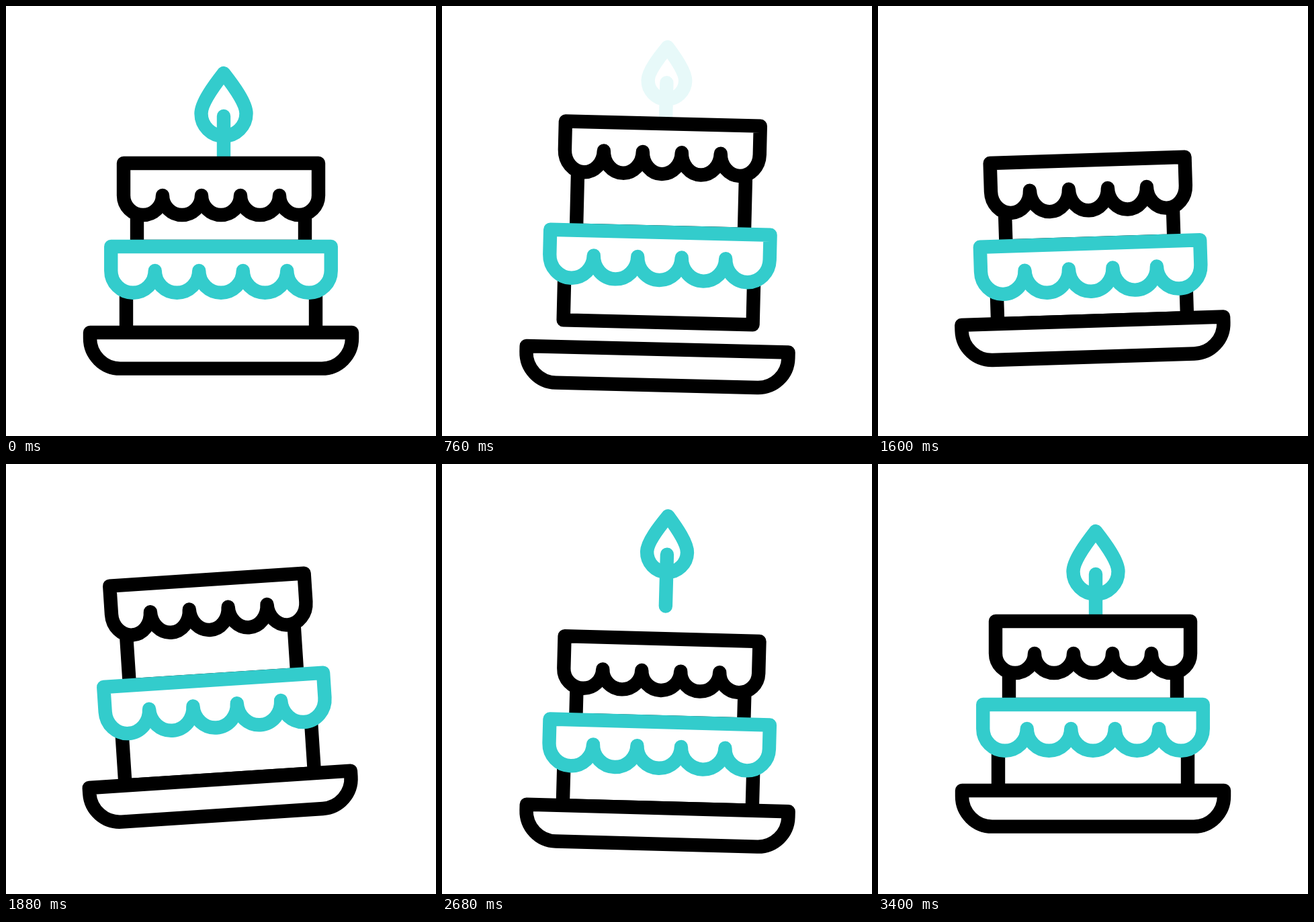
These frames come from a looping animation (640x640 px, 3600 ms). An HTML page with a canvas:

```html
<!DOCTYPE html>
<html lang="en">
<head>
<meta charset="utf-8">
<title>Birthday cake</title>
<style>
  html, body { margin: 0; height: 100%; overflow: hidden; background: #fff; }
  canvas { display: block; }
</style>
</head>
<body>
<canvas id="stage" width="640" height="640"></canvas>
<script>
const ctx = document.getElementById('stage').getContext('2d');
const LOOP = 3600, BLACK = '#000', TEAL = '#33cccc';

const clamp = u => Math.min(1, Math.max(0, u));

// Sine easing from 0 to 1 between two times.
const ease = (t, from, to) => (1 - Math.cos(Math.PI * clamp((t - from) / (to - from)))) / 2;

// Eases up, holds, and eases back down.
const pulse = (t, start, full, release, end) => ease(t, start, full) - ease(t, release, end);
const hop = (t, start, peak, end) => pulse(t, start, peak, peak, end);

// Swings through [time, value] turning points, starting from zero at 200 ms.
function swing(t, ...turns) {
  let time = 200, value = 0, sum = 0;
  for (const [nextTime, nextValue] of turns) {
    sum += (nextValue - value) * ease(t, time, nextTime);
    time = nextTime;
    value = nextValue;
  }
  return sum;
}

function draw(color, fill, build) {
  ctx.beginPath();
  build();
  if (fill) {
    ctx.fillStyle = '#fff';
    ctx.fill();
  }
  ctx.strokeStyle = color;
  ctx.stroke();
}

function candle(y, size, alpha) {
  ctx.globalAlpha = alpha;
  draw(TEAL, false, () => {
    ctx.save();
    ctx.translate(324, 100 + y);
    ctx.scale(size, size);
    ctx.moveTo(0, 0);
    ctx.bezierCurveTo(-14, 18, -33.5, 44, -33.5, 60);
    ctx.arc(0, 60, 33.5, Math.PI, 0, true);
    ctx.bezierCurveTo(33.5, 44, 14, 18, 0, 0);
    ctx.closePath();
    ctx.moveTo(0, 64);
    ctx.restore();
    ctx.lineTo(324, 234 + y);
  });
  ctx.globalAlpha = 1;
}

function plate() {
  draw(BLACK, true, () => {
    ctx.moveTo(125, 486);
    ctx.lineTo(515, 486);
    ctx.arc(470, 494.6, 45, 0, Math.PI / 2);
    ctx.arc(170, 494.6, 45, Math.PI / 2, Math.PI);
    ctx.closePath();
  });
}

function walls(half, from, to) {
  draw(BLACK, false, () => {
    ctx.moveTo(320 - half, from);
    ctx.lineTo(320 - half, to);
    ctx.lineTo(320 + half, to);
    ctx.lineTo(320 + half, from);
  });
}

function icing(color, y, depth, radius, drop) {
  draw(color, true, () => {
    ctx.moveTo(320 - 5 * radius, y);
    ctx.lineTo(320 + 5 * radius, y);
    for (let i = 2; i >= -2; i--) {
      ctx.ellipse(320 + 2 * i * radius, y + depth, radius, drop, 0, 0, Math.PI);
    }
    ctx.closePath();
  });
}

function render(t) {
  // The whole cake bobs and sways.
  const bob = swing(t, [853, 26], [1739, -20], [2576, 27], [3400, 0]);
  const angle = swing(t, [1087, 2], [1940, -3.8], [2796, 1.8], [3400, 0]);

  // The tiers jump twice and sink in between; the icing sags meanwhile.
  const lift = 84 * hop(t, 200, 740, 1340) + 62 * hop(t, 1580, 1950, 2660);
  const sink = 13 * hop(t, 760, 1600, 2700);
  const sag = pulse(t, 200, 700, 2100, 2760);
  const topY = 234 + sink - lift;
  const middleY = 358 + sink - 0.55 * lift;
  const baseY = 486 - 40 * hop(t, 200, 740, 1385);

  // The candle flies off, fades and comes back down in two steps.
  const rise = 28 * pulse(t, 200, 950, 2150, 2780) + 47 * pulse(t, 200, 950, 2850, 3400);
  const size = 1 - 0.17 * pulse(t, 200, 760, 2160, 3400);
  const alpha = 1 - pulse(t, 480, 840, 2080, 2380);

  ctx.clearRect(0, 0, 640, 640);
  ctx.save();
  ctx.lineWidth = 20.4;
  ctx.lineCap = ctx.lineJoin = 'round';
  ctx.translate(320, 512 + bob);
  ctx.rotate(angle * Math.PI / 180);
  ctx.translate(-320, -512);

  candle(-rise, size, alpha);
  walls(141, middleY + 20, baseY);
  plate();
  walls(125, topY + 60, middleY);
  icing(BLACK, topY, 48 - 5.5 * sag, 29, 29 + 3.5 * sag);
  icing(TEAL, middleY, 36 + sag, 32.75, 32.75 + 1.5 * sag);
  ctx.restore();
}

function tick() {
  render(performance.now() % LOOP);
  requestAnimationFrame(tick);
}
tick();
</script>
</body>
</html>
```
